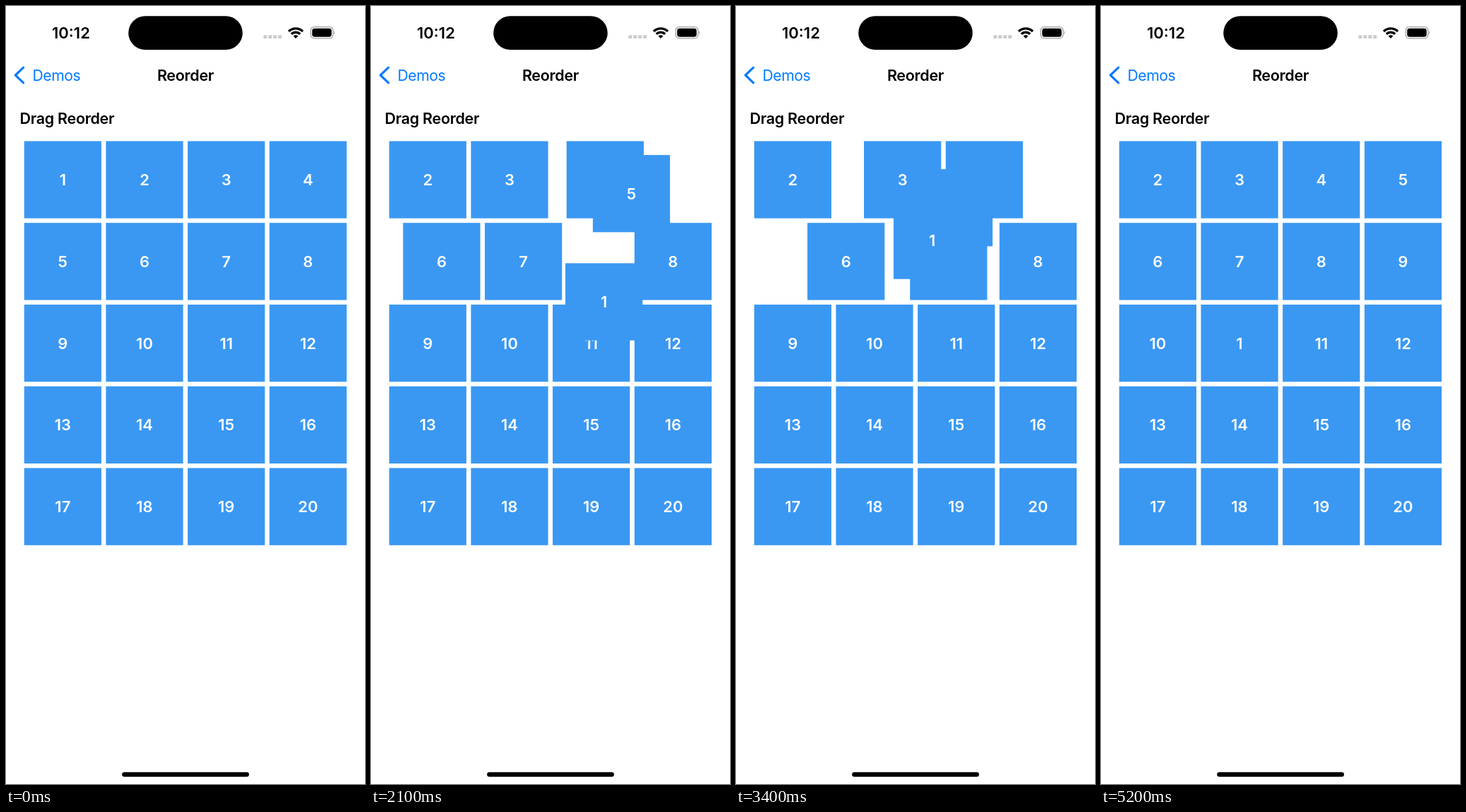
Write an HTML page that moves like this. It is 508 px wide and 1102 px high and loops after 6.3 s.

```html
<!DOCTYPE html>
<html lang="en">
<head>
<meta charset="utf-8">
<title>Drag Reorder</title>
<style>
  html, body { margin: 0; width: 100%; height: 100%; overflow: hidden; background: #fff; }
  svg { display: block; width: 100%; height: 100%; font-family: Inter, "Noto Sans", sans-serif; }
  text { font-size: 21.5px; font-weight: 600; letter-spacing: -.3px; }
  .clock { font-size: 22px; letter-spacing: 0; }
  .back { font-size: 21.2px; font-weight: 400; letter-spacing: -.45px; }
  .tile rect { fill: #3a98f3; }
  .tile text { fill: #fff; font-size: 17px; letter-spacing: 0; text-anchor: middle; }
</style>
</head>
<body>
<svg viewBox="0 0 508 1102">
  <text class="clock" x="65" y="46">10:12</text>
  <rect x="173.2" y="14.3" width="161.6" height="47.8" rx="23.9"/>
  <path d="M364.4 43.6H390.1" stroke="#ccc" stroke-width="4.6" stroke-dasharray="5 1.9"/>
  <path d="M400 36A14.2 14.2 0 0 1 420 36M403.8 39.8A8.8 8.8 0 0 1 416.2 39.8" fill="none" stroke="#000" stroke-width="3.4"/>
  <path d="M406.6 42.6A4.8 4.8 0 0 1 413.4 42.6L410 46Z"/>
  <rect x="431.2" y="29.6" width="31.6" height="16.2" rx="5" fill="none" stroke="#a0a0a0" stroke-width="1.3"/>
  <rect x="433.2" y="31.7" width="27.5" height="12" rx="3.4"/>
  <path d="M464.2 35.2Q466.4 37.7 464.2 40.2Z" fill="#a0a0a0"/>

  <path d="M24.7 87.2L13.3 98L24.7 108.8" fill="none" stroke="#007aff" stroke-width="3.1" stroke-linecap="round" stroke-linejoin="round"/>
  <text class="back" x="37.5" y="105.8" fill="#007aff">Demos</text>
  <text x="254" y="105.8" text-anchor="middle">Reorder</text>
  <text x="19.5" y="167.3">Drag Reorder</text>
  <g id="grid" transform="scale(1.29262 1.29343)"></g>
  <rect x="164.2" y="1085.2" width="179.7" height="6.5" rx="3.2"/>
</svg>
<script>
const LOOP = 6300, STEP = 100, MOVE = 350;
const COUNT = 20, COLS = 4, LEFT = 19.9, TOP = 148, SIZE = 84.5, PITCH = 89.5;

// Drag gesture: time, then column and row
const path = [
  [1150, 0, 0], [1350, .55, .02], [1700, 1.332, .238], [1850, 1.95, .53],
  [2100, 2.155, 1.494], [2570, 1.47, 2.08], [2700, 1.04, 2.009], [3000, 1.55, 1.45],
  [3120, 1.475, 1], [3200, .4, .62], [3260, .56, .46], [3372, 1.48, .52],
  [3400, 1.705, .743], [3600, 2.05, 1.55], [3980, 1.73, 2.528], [4000, 1.697, 2.536],
  [4220, 1.45, 2.46], [4700, .54, 2.42], [4900, .74, 1.83], [5200, 1, 2]
];

function slope(i, k) {
  const a = path[i - 1], b = path[i + 1];
  return a && b ? (b[k] - a[k]) / (b[0] - a[0]) : 0;
}

// Smooth curve through the path points
function dragCell(t) {
  const next = path.findIndex(p => p[0] > t);
  if (next < 1) return path.at(next).slice(1);
  const i = next - 1, a = path[i], b = path[next];
  const d = b[0] - a[0], u = (t - a[0]) / d, v = 1 - u;
  return [1, 2].map(k =>
    v * v * (1 + 2 * u) * a[k] + u * u * (3 - 2 * u) * b[k] +
    d * u * v * (v * slope(i, k) - u * slope(next, k)));
}

// The dragged tile claims each slot its centre enters.
function findClaims() {
  const claims = [];
  let held = 0;
  for (let t = 0; t < LOOP; t += 2) {
    const cell = dragCell(t), [col, row] = cell.map(Math.round);
    const inside = cell.every(c => Math.abs(c - Math.round(c)) < SIZE / PITCH / 2);
    const slot = row * COLS + col;
    if (inside && slot !== held) claims.push({ start: t, slot: held = slot });
  }
  return claims;
}
const claims = findClaims();

// cubic-bezier(.42, 0, .58, 1)
function ease(x) {
  if (x <= 0) return 0;
  if (x >= 1) return 1;
  let lo = 0, hi = 1, u = .5;
  for (let i = 0; i < 24; i++) {
    const v = 1 - u;
    if (1.26 * u * v * v + 1.74 * u * u * v + u * u * u < x) lo = u; else hi = u;
    u = (lo + hi) / 2;
  }
  return u * u * (3 - 2 * u);
}

// The other tiles fill the slots around the claimed one; overlapping moves add up.
function restCell(n, t) {
  const cellFor = claimed => {
    const slot = n - 2 < claimed ? n - 2 : n - 1;
    return [slot % COLS, Math.floor(slot / COLS)];
  };
  let from = cellFor(0), [col, row] = from;
  for (const { start, slot } of claims) {
    const to = cellFor(slot), p = ease((t - start) / MOVE);
    col += (to[0] - from[0]) * p;
    row += (to[1] - from[1]) * p;
    from = to;
  }
  return [col, row];
}

function makeTile(n) {
  const add = (parent, name, attrs) => {
    const el = parent.appendChild(document.createElementNS("http://www.w3.org/2000/svg", name));
    for (const key in attrs) el.setAttribute(key, attrs[key]);
    return el;
  };
  const g = add(document.getElementById("grid"), "g", { class: "tile" });
  add(g, "rect", { width: SIZE, height: SIZE });
  add(g, "text", { x: SIZE / 2, y: SIZE / 2 + 6.2 }).textContent = n;
  return { n, g };
}

const tiles = [];
for (let n = 2; n <= COUNT; n++) tiles.push(makeTile(n));
tiles.push(makeTile(1));

function draw(now) {
  const t = Math.floor(now % LOOP / STEP) * STEP;
  for (const { n, g } of tiles) {
    const [col, row] = n === 1 ? dragCell(t) : restCell(n, t);
    g.setAttribute("transform", `translate(${LEFT + col * PITCH} ${TOP + row * PITCH})`);
  }
}

const begin = performance.now();
function tick() {
  draw(performance.now() - begin);
  requestAnimationFrame(tick);
}
tick();
</script>
</body>
</html>
```
